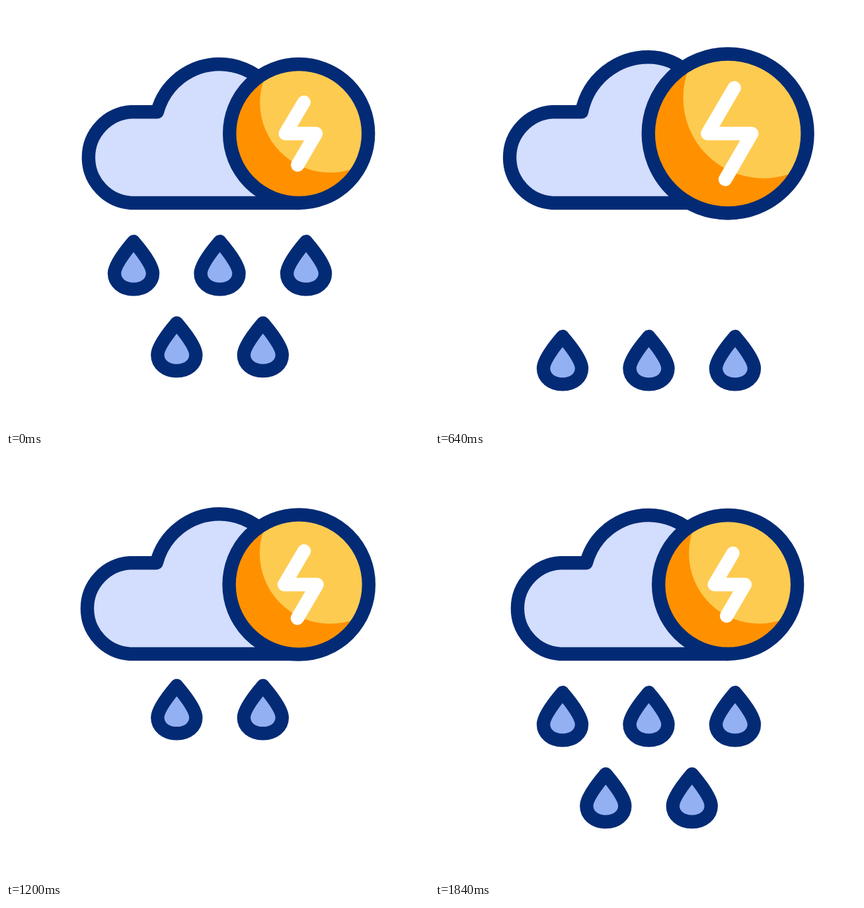
Write an HTML page that moves like this. It is 640 px wide and 640 px high and loops after 1.92 s.

```html
<!DOCTYPE html>
<html lang="en">
<head>
<meta charset="utf-8">
<title>Storm cloud</title>
<style>
  html, body { margin: 0; height: 100%; overflow: hidden; background: #fff; }
  svg { display: block; width: 100%; height: 100%; }
  .line { stroke: #032b75; stroke-width: 20.4; stroke-linejoin: round; stroke-linecap: round; }
</style>
</head>
<body>
<svg viewBox="0 0 640 640">
  <defs>
    <path id="drop" class="line" fill="#93b0f3"
      d="M0 0C12 14 29 36 29 48C29 62 17 72.3 0 72.3S-29 62 -29 48C-29 36 -12 14 0 0Z"/>
    <clipPath id="disc"><circle r="105"/></clipPath>
  </defs>
  <g id="upper">
    <use href="#drop" x="193"/><use href="#drop" x="323.5"/><use href="#drop" x="454"/>
  </g>
  <g id="lower">
    <use href="#drop" x="258.3"/><use href="#drop" x="388.8"/>
  </g>
  <path id="cloud" class="line" fill="#d3ddfd"/>
  <g id="sun">
    <circle r="105" fill="#ff9100"/>
    <circle cx="47" cy="-47" r="106" fill="#fdcb50" clip-path="url(#disc)"/>
    <circle class="line" r="105" fill="none" vector-effect="non-scaling-stroke"/>
  </g>
  <path id="bolt" class="line" fill="none" style="stroke:#fff"/>
</svg>
<script>
const LOOP = 1920, STEP = 40;
const [upper, lower, cloud, sun, bolt] =
  ['upper', 'lower', 'cloud', 'sun', 'bolt'].map(id => document.getElementById(id));

const ease = (t, a, b) => {
  const u = Math.min(1, Math.max(0, (t - a) / (b - a)));
  return u * u * (3 - 2 * u);
};
// Rises over a..b, falls back over c..d
const pulse = (t, a, b, c, d) => ease(t, a, b) - ease(t, c, d);

const move = (el, x, y, s = 1) =>
  el.setAttribute('transform', `translate(${x} ${y}) scale(${s})`);

// Drops speed up off the stage, then slow down out of the cloud
function rain(el, t, rest, start, end, brake) {
  const y = t < 900
    ? rest + 9.5e-4 * Math.max(0, t - start) ** 2
    : rest - brake * Math.max(0, end - t) ** 2;
  move(el, 0, Math.max(190, y));
}

function drawCloud(k) {
  const left = 189.3 - 13.8 * k, corner = 228.8 - 8 * k, top = 88 - 12.6 * k;
  const dx = 323 - corner, dy = 160 - top;
  const r = (dx * dx + dy * dy) / (2 * dy);
  const q = 97.4 - 12 * k;
  const endX = 323 + q * Math.SQRT1_2, endY = top + q * (1 - Math.SQRT1_2);
  cloud.setAttribute('d', `M443 298H${left}A69 69 0 0 1 ${left} 160.3H${corner}
    A${r} ${r} 0 0 1 323 ${top}A${q} ${q} 0 0 1 ${endX} ${endY}L443 193Z`);
}

function drawBolt(k) {
  const x = 2.4 * k, y = 26 * k, side = 12.3 * k;
  bolt.setAttribute('d', `M${450.7 + x} ${145.6 - y}L${422.6 - side} 193
    H${469 + side}L${441.2 - x} ${240.5 + y}`);
}

function draw(now) {
  const t = Math.floor(now % LOOP / STEP) * STEP;
  rain(upper, t, 356.3, 251, 1830, 4.58e-4);
  rain(lower, t, 479.7, 139, 1693, 5.5e-4);
  drawCloud(pulse(t, 279, 752, 853, 1306));
  move(sun, 443.2, 193, 1 + 0.147 * pulse(t, 40, 640, 640, 1280));
  drawBolt(pulse(t, 210, 787, 787, 1322));
}

const origin = performance.now();
function tick() {
  draw(performance.now() - origin);
  requestAnimationFrame(tick);
}
tick();
</script>
</body>
</html>
```
